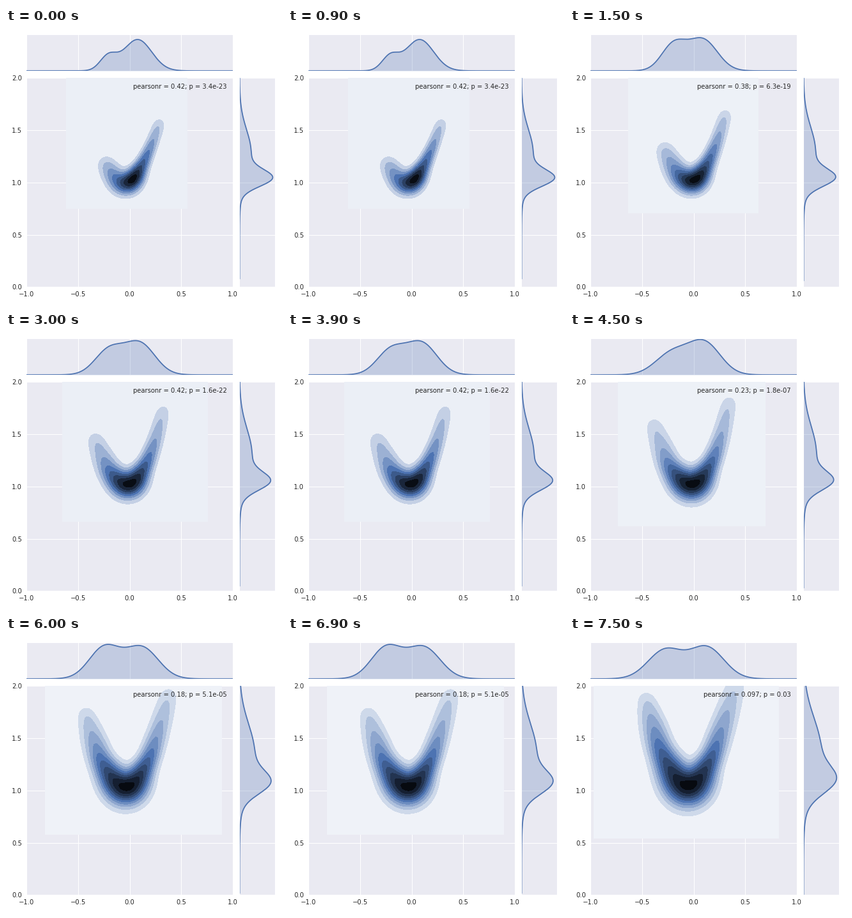
A matplotlib script for the animation above (8 s loop, 432x432 px).

```python
import colorsys

import matplotlib.pyplot as plt
import numpy as np
from matplotlib.animation import FuncAnimation

SIZE, DPI = 432, 72
BLUE, INK, PANEL = "#4C72B0", "#262626", "#EAEAF2"
LEFT, RIGHT, TOP, BOTTOM = 32, 355, 78.3, 405.3
HOLD = 3  # ticks of 500 ms per pose

# The cloud is a bent ridge that grows from pose to pose. Its shape is blended
# between three keys; knots run from left tip over the bottom to right tip as
# (x, y, height, spread).
KEY_AT = (0, 3, 5)
RIDGES = np.array([
    [(155, 210, .24, 10.5), (167, 230, .40, 11.5), (183, 244, .70, 12.5),
     (197, 239, 1, 11), (212, 216, .64, 8), (227, 184, .39, 6.8),
     (241, 147, .18, 7.5)],
    [(130, 142, .16, 10.5), (143, 178, .27, 12.5), (159, 215, .54, 12.5),
     (191, 242, 1, 16.5), (217, 212, .62, 10.8), (235, 168, .34, 9.8),
     (250, 107, .16, 10)],
    [(118, 95, .15, 11), (130, 140, .36, 14), (147, 190, .63, 14.5),
     (184, 241, 1, 21), (217, 199, .68, 13), (236, 150, .40, 13),
     (262, 70, .13, 13)],
])
# Side curve: a main bell and a wide tail, each (centre, width, height).
SIDES = np.array([
    [(235, 13, 42), (195, 36, 18)],
    [(233, 14.5, 35), (190, 42, 20)],
    [(226, 21, 34), (178, 50, 27)],
])


def blend(keys, k):
    """Value of the keyed array at pose k."""
    w = [np.interp(k, KEY_AT, row) for row in np.eye(len(KEY_AT))]
    return np.tensordot(w, keys, 1)


def bells(q, parts):
    return sum(h * np.exp(-0.5 * ((q - c) / w) ** 2) for c, w, h in parts)


def smooth(knots, n):
    """Cubic Hermite curve through evenly timed knots, n samples."""
    m = np.gradient(knots, axis=0)
    q = np.linspace(0, len(knots) - 1, n)
    i = np.minimum(q.astype(int), len(knots) - 2)
    t = (q - i)[:, None]
    return ((1 + 2 * t) * (1 - t) ** 2 * knots[i] + t * (1 - t) ** 2 * m[i]
            + t * t * (3 - 2 * t) * knots[i + 1] + t * t * (t - 1) * m[i + 1])


def density(ridge, x0, x1, y1):
    """Height field around the ridge, scaled to a peak of 1."""
    x, y, a, s = smooth(ridge, 220).T
    w = np.hypot(np.gradient(x), np.gradient(y)) * a ** 2 / s
    gx, gy = np.linspace(x0, x1, 170), np.linspace(TOP - 6, y1, 170)
    d2 = (gx[None, :, None] - x) ** 2 + (gy[:, None, None] - y) ** 2
    z = np.sqrt((w * np.exp(-d2 / s ** 2)).sum(-1))
    return gx, gy, z / z.max()


def shades(layers):
    """Equal lightness steps of the base blue, from pale to black."""
    rgb = [int(BLUE[i:i + 2], 16) / 255 for i in (1, 3, 5)]
    h, _, s = colorsys.rgb_to_hls(*rgb)
    return [colorsys.hls_to_rgb(h, 1 - (i + 0.5) / layers, s)
            for i in range(layers)]


def panel(x0, x1, y0, y1):
    ax = fig.add_axes([x0 / SIZE, 1 - y1 / SIZE,
                       (x1 - x0) / SIZE, (y1 - y0) / SIZE])
    ax.set(xlim=(x0, x1), ylim=(y1, y0), facecolor=PANEL,
           xticks=[], yticks=[], axisbelow=True)
    ax.spines[:].set_visible(False)
    ax.tick_params(length=0, pad=7, labelsize=10, labelcolor=INK)
    ax.grid(color="white", lw=1, ls="-")
    return ax


def pose(k, note, layers, x0, x1, left_bell):
    """Draw pose k and return its artists, hidden."""
    gx, gy, z = density(blend(RIDGES, k), x0, x1, 283 + 6.8 * k)
    levels = [-1, *range(1, layers), layers + 1]
    parts = [joint.contourf(gx, gy, z * (layers - 0.5), levels=levels,
                            colors=shades(layers))]

    x = np.arange(LEFT, RIGHT + 1)
    right_bell = (206 + 1.6 * k, 22 + k, 49)
    y = 67 - bells(x, [left_bell, right_bell])
    parts.append(above.fill_between(x, 67, y, color=BLUE, alpha=0.25, lw=0))
    parts += above.plot(x, y, color=BLUE, lw=1.75)

    y = np.arange(TOP - 4, 393 + 2.5 * k)
    x = 365.6 + bells(y, blend(SIDES, k))
    parts.append(beside.fill_betweenx(y, 365.6, x, color=BLUE,
                                      alpha=0.25, lw=0))
    parts += beside.plot(x, y, color=BLUE, lw=1.75)

    parts.append(joint.text(345.6, 95.3, note, size=10, color=INK, ha="right",
                            va="baseline", zorder=5))
    for p in parts:
        p.set_visible(False)
    return parts


plt.rcParams["font.family"] = "DejaVu Sans"
fig = plt.figure(figsize=(SIZE / DPI, SIZE / DPI), dpi=DPI, facecolor="white")
joint = panel(LEFT, RIGHT, TOP, BOTTOM)
above = panel(LEFT, RIGHT, 11, 67)
beside = panel(366, 421, TOP, BOTTOM)

xt, yt = np.linspace(LEFT, RIGHT, 5), np.linspace(BOTTOM, TOP, 5)
joint.set_xticks(xt, [f"{v:.1f}".replace("-", "\u2212")
                      for v in np.linspace(-1, 1, 5)])
joint.set_yticks(yt, [f"{v:.1f}" for v in np.linspace(0, 2, 5)])
above.set_xticks(xt, [""] * 5)
beside.set_yticks(yt, [""] * 5)

poses = [
    pose(0, "pearsonr = 0.42; p = 3.4e-23", 9, 94, 284, (160, 13, 22)),
    pose(1, "pearsonr = 0.38; p = 6.3e-19", 10, 91, 295, (162, 19, 40)),
    pose(2, "pearsonr = 0.42; p = 1.6e-22", 9, 88, 316, (161, 22, 38)),
    pose(3, "pearsonr = 0.23; p = 1.8e-07", 10, 75, 306, (160, 26, 34)),
    pose(4, "pearsonr = 0.18; p = 5.1e-05", 11, 61, 338, (154, 24, 49)),
    pose(5, "pearsonr = 0.097; p = 0.03", 11, 37, 327, (149, 27, 45)),
]


def update(i):
    for k, parts in enumerate(poses):
        for p in parts:
            p.set_visible(k == i // HOLD)
    return []


anim = FuncAnimation(fig, update, frames=HOLD * 5 + 1, interval=500,
                     repeat=True, repeat_delay=0, init_func=lambda: update(0))
plt.show()
```
